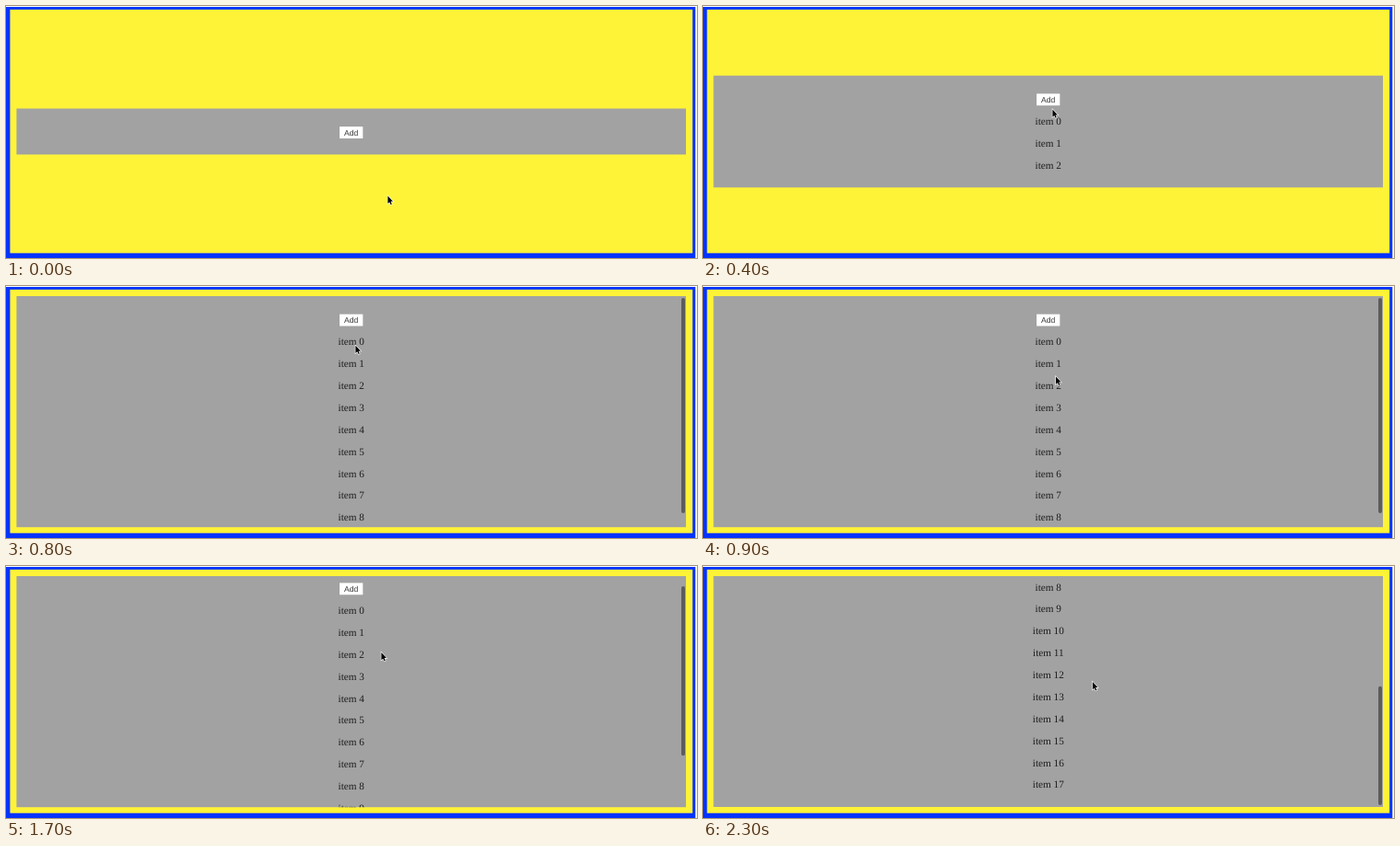
Recreate the animation shown at these times as an HTML page. Size 750x274 px, loop 2.4 s.

```html
<!DOCTYPE html>
<html lang="en">
<head>
<meta charset="utf-8">
<title>Growing list</title>
<style>
  html, body { margin: 0; width: 100%; height: 100%; overflow: hidden; background: #fff; }
  svg { display: block; }
  text { text-anchor: middle; text-rendering: geometricPrecision; }
  #list { font: 11.23px "Liberation Serif", "Times New Roman", serif; fill: #1c1c1c; }
  #list .label { font: 8.6px "Liberation Sans", Arial, sans-serif; fill: #383838; }
</style>
</head>
<body>
<svg width="750" height="274">
  <rect y="1" width="748.3" height="273" fill="#0433ff"/>
  <rect x="4.4" y="3.9" width="740.8" height="264.8" fill="#fff338"/>
  <svg y="11" width="750" height="251.2">
    <g id="list">
      <rect id="panel" x="11.4" width="726.6" fill="#a2a2a2"/>
      <rect x="361.8" y="19.4" width="25.8" height="13.6" fill="#8f8f8f"/>
      <rect x="362" y="19.6" width="25.4" height="13" fill="#fff"/>
      <text class="label" x="374.6" y="29">Add</text>
    </g>
  </svg>
  <rect id="thumb" x="733" width="4" rx="2" fill="#5c5c5c"/>
  <path id="cursor" d="M.4 .6V8.8L2.3 7.2 3.6 10 4.8 9.5 3.6 6.6H6Z" stroke="#fff" stroke-width="1.2" paint-order="stroke"/>
</svg>
<script>
const $ = id => document.getElementById(id);
const LOOP = 2400, STEP = 100;
const TOP = 11, VIEW = 251, HEAD = 50, PITCH = 23.87, TRACK = 247;
const PER_CLICK = 3;
const clicks = [200, 500, 800, 1200, 1900, 2100];

const heightOf = count => HEAD + count * PITCH;
const topOf = count => Math.max(0, (VIEW - heightOf(count)) / 2);
const phase = (t, from, to) => Math.min(1, Math.max(0, (t - from) / (to - from)));

// The pointer visits the button for every click and wanders in between.
const stops = [
  { t: 0, x: 414, y: 206 },
  { t: 900, x: 382.6, y: 98 },
  { t: 1400, x: 407, y: 93.5 },
  { t: 1800, x: 407, y: 93.5 },
  { t: 2300, x: 422.5, y: 125.5 },
  ...clicks.map((t, i) => ({ t, x: 379, y: TOP + topOf(i * PER_CLICK) + 24.2 }))
].sort((a, b) => a.t - b.t);

function pointerAt(t) {
  const i = stops.findLastIndex(s => s.t <= t);
  const a = stops[i], b = stops[i + 1] || a;
  const f = phase(t, a.t, b.t) || 0;
  return [a.x + (b.x - a.x) * f, a.y + (b.y - a.y) * f];
}

// Scroll down and back once, then to the very end.
const scrollAt = t =>
  Math.sin(Math.PI * phase(t, 1303, 1756)) ** 2 + phase(t, 2100, 2300);

const rows = Array.from({ length: clicks.length * PER_CLICK }, (_, i) => {
  const row = document.createElementNS("http://www.w3.org/2000/svg", "text");
  row.setAttribute("x", 374.8);
  row.setAttribute("y", 53.3 + i * PITCH);
  row.textContent = "item " + i;
  return $("list").appendChild(row);
});

function draw(t) {
  const count = PER_CLICK * clicks.filter(c => c <= t).length;
  const height = heightOf(count);
  const offset = Math.max(0, height - VIEW) * scrollAt(t);
  $("list").setAttribute("transform", `translate(0 ${topOf(count) - offset})`);
  $("panel").setAttribute("height", height);
  rows.forEach((row, i) => row.style.display = i < count ? "" : "none");

  $("thumb").style.display = height > VIEW ? "" : "none";
  $("thumb").setAttribute("y", 13 + offset / height * TRACK);
  $("thumb").setAttribute("height", Math.min(1, VIEW / height) * TRACK);

  $("cursor").setAttribute("transform", `translate(${pointerAt(t)})`);
}

const start = performance.now();
function tick() {
  const t = (performance.now() - start) % LOOP;
  draw(Math.floor(t / STEP) * STEP);
  requestAnimationFrame(tick);
}
tick();
</script>
</body>
</html>
```
